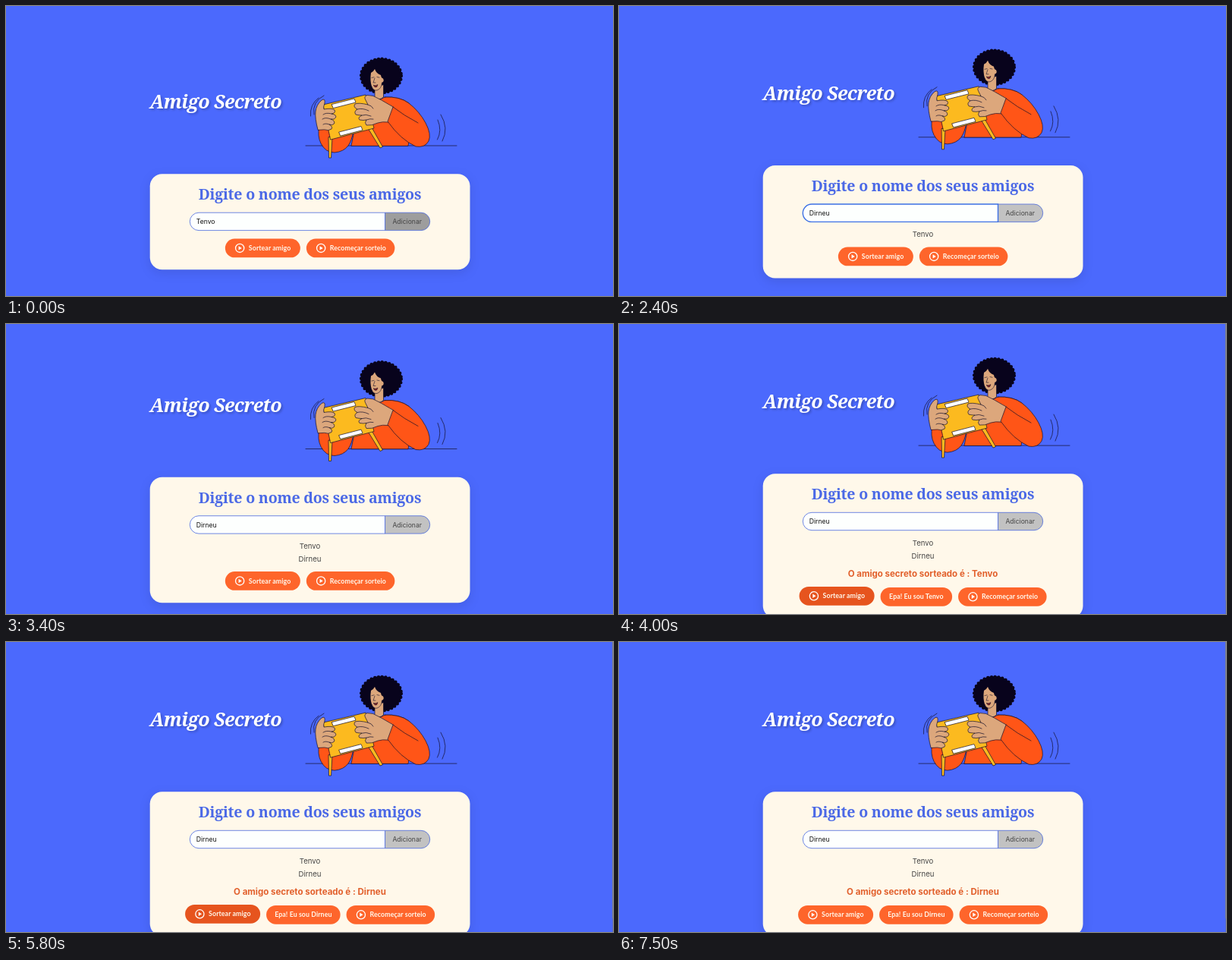
Animation, 800 px wide and 382 px high, one loop 7.6 s. Source, as an HTML page:

```html
<!DOCTYPE html>
<html lang="pt-BR">
<head>
<meta charset="utf-8">
<title>Amigo Secreto</title>
<style>
html, body { margin: 0; width: 100%; height: 100%; overflow: hidden; background: #4b69fd; }
svg { display: block; }
text { font-family: Inter, sans-serif; }
.title { font: italic 700 25px "Noto Serif", serif; letter-spacing: -.65px; fill: #fff; text-shadow: 2px 2px 3px rgba(0,0,0,.22); }
.head { font: 700 19.6px "Noto Serif", serif; letter-spacing: -.23px; fill: #4b69e6; }
.label { font: 700 8.8px Lato, sans-serif; letter-spacing: .08px; fill: #fff8ec; }
.field { font-size: 8.6px; }
.item { font-size: 9.6px; fill: #444; }
.result { font-size: 11.5px; font-weight: 700; fill: #e2602c; }
.card { fill: #fff8ea; filter: drop-shadow(0 4px 7px rgba(0,0,0,.1)); }
.mid { text-anchor: middle; }
.art { stroke: #15102b; stroke-width: .7; stroke-linejoin: round; stroke-linecap: round; }
.skin { fill: #dca77c; }
.shirt { fill: #ff5517; }
.wood { fill: #fcba1f; }
.line { fill: none; }
</style>
</head>
<body>
<svg width="800" height="382">
  <g id="page">
    <text class="title" x="189.5" y="135">Amigo Secreto</text>
    <g class="art">
      <path class="line" d="M395 184H594M412 121Q400 130 401.5 145M419 118Q403 126 406 143M569 150Q575 164 568.5 176M573 143Q584 161 575 178"/>
      <!-- hair -->
      <g fill="#08031c" stroke="#08031c">
        <ellipse cx="494.5" cy="92" rx="26.8" ry="22.8"/>
        <ellipse cx="494.5" cy="92" rx="26.4" ry="22.2" class="line" stroke-width="4.4" stroke-dasharray="0 4.8"/>
      </g>
      <!-- torso -->
      <path class="shirt" d="M455 184Q461 152 468 132L486 121Q492 125 499 120Q519 119 531 128Q540 136 530 184Z"/>
      <path class="skin" d="M486 106V121Q492 125 497.500 120V104Z"/>
      <path class="skin" stroke="none" d="M481 88Q479.500 98 482 106Q484 112 489 111Q495 109 495.500 101Q499 99 497 95.500Q494.500 95 494 91Q488 89 486 83Q484 87 481 88Z"/>
      <path class="line" d="M482 94.500l3-.7M489 93.500l3 .7M486 95l-2 6h3M482 106Q484 112 489 111Q495 109 495.500 101" stroke-width=".6"/>
      <path d="M484.500 104.500q3 .8 5.500-1q-.8 4-3 3.500q-2-.4-2.500-2.500Z" fill="#7d2020" stroke-width=".5"/>
      <!-- far arm -->
      <path class="shirt" d="M413 158Q410 171 415 181Q421 193 433 193Q445 192 451 184Q456 177 458 164Z"/>
      <!-- box on legs -->
      <path class="wood" d="M425 173L425.500 200H428.500L430 173ZM477 161L493 187L496.500 185.500L482 160Z"/>
      <path class="wood" d="M418 130L474 117L485 161L428 176Z"/>
      <path fill="#fff" d="M429.500 129.500L459 122L461 127L431.500 134.500ZM439 166L468 158.500L470 163.500L441 171Z"/>
      <!-- hands -->
      <path class="skin" d="M411 163Q407 148 408 139Q409 130 416 124Q421 121 420 128Q418 133 419 136Q430 134 433 137Q435 141 429 142Q436 143 434.500 147Q433 150 428 149Q434 151 432.500 155Q430 158 426 156Q431 159 429 162Q425 165 420 163Z"/>
      <path class="line" d="M429 142Q422 140 418 143M428 149Q421 146 417 149M426 156Q421 154 418 156"/>
      <path class="skin" d="M510.500 133C503 129 497 125 491 122Q484 117 476 117.500Q471 119 474 124L477 130Q465 127 460 129Q457 133 463 136Q458 139 461 143Q465 144 469 144Q463 147 466 150Q471 151 475 150Q472 154 475 157Q482 158 490 154Q496 152 504 153Z"/>
      <path class="line" d="M463 136Q470 134 478 138M469 144Q474 142 481 145M475 150Q480 148 484 149M477 130Q482 131 484 135"/>
      <!-- near arm -->
      <path class="shirt" d="M500 120Q519 119 531 128Q545 139 553 154Q561 169 557 178Q552 187 540 185Q520 176 503 152L510 133Q518 139 529 146" stroke="none"/>
      <path class="line" d="M499 120Q519 119 531 128Q545 139 553 154Q561 169 557 178Q552 187 540 185Q520 176 503 152L510 133Q524 144 543 154"/>
    </g>
    <g id="form"></g>
  </g>
  <g id="scroll">
    <path d="M799.500 0V382" stroke="#5a6bc9"/>
    <path d="M799.500 0V364" stroke="#7a7f90"/>
  </g>
</svg>
<script>
const LOOP = 7600, FIRST = "Tenvo", SECOND = "Dirneu";
const $ = id => document.getElementById(id);
const within = (t, a, b) => t >= a && t < b;
const clamp = v => Math.max(0, Math.min(1, v));

// page shift, card height and button top for each amount of content
const LAYOUTS = [
  { shift: 0, height: 126, top: 306.5 },
  { shift: 11.2, height: 148.5, top: 328.7 },
  { shift: 19.5, height: 165.5, top: 345.5 },
  { shift: 23.9, height: 190, top: 370.8 }
];

function pill(x, y, w, label, icon, hover = 0) {
  const fill = `rgb(${254 - 24 * hover},${101 - 17 * hover},${43 - 13 * hover})`;
  const content = icon
    ? `<circle cx="19.3" cy="12.4" r="5.6" fill="none" stroke="#fff" stroke-width="1.3"/>
       <path d="M17.700 9.700v5.400l4.200-2.700z" fill="#fff"/>
       <text class="label" x="31" y="15.600">${label}</text>`
    : `<text class="label mid" x="${w / 2}" y="15.600">${label}</text>`;
  return `<g transform="translate(${x} ${y - hover})">
    <rect width="${w}" height="24.8" rx="12.4" fill="${fill}"/>${content}</g>`;
}

function field(t) {
  const selected = within(t, 950, 1250);
  const focused = within(t, 950, 2650);
  const pressed = t < 400 || within(t, 2650, 3000);
  const typed = t < 1250 ? FIRST : SECOND.slice(0, 1 + Math.floor((t - 1250) / 140));
  return `
    <path d="M499.500 272.200H547a11.700 11.700 0 0 1 0 23.400H499.500Z" fill="${pressed ? "#9d9d9d" : "#c2c2c2"}" stroke="#4b69dd" stroke-width=".8"/>
    <path d="M499.500 272.200H254a11.700 11.700 0 0 0 0 23.400H499.500Z" fill="#fdfffe" stroke="${focused ? "#3d70e4" : "#4b69dd"}" stroke-width="${focused ? 1.4 : .8}"/>
    ${selected ? '<rect x="250.500" y="278.500" width="25" height="11" fill="#4c7be8"/>' : ""}
    <text class="field" x="250.800" y="287" fill="${selected ? "#fff" : "#111"}">${typed}</text>
    <text class="field mid" x="528.700" y="287" fill="#444">Adicionar</text>`;
}

function render(t) {
  const step = [300, 2900, 3800].filter(at => t >= at).length;
  const { shift, height, top } = LAYOUTS[step];
  const drawn = t < 5500 ? FIRST : SECOND;
  const hover = within(t, 3500, 4400) ? 1 : t >= 5200 ? clamp((6100 - t) / 200) : 0;

  const items = [FIRST, SECOND].slice(0, step).map((name, i) =>
    `<text class="item mid" x="400.500" y="${315.6 + 17 * i}">${name}</text>`).join("");
  const result = step < 3 ? "" :
    `<text class="result mid" x="400.500" y="357">O amigo secreto sorteado é : ${drawn}</text>`;

  const claim = step < 3 ? 0 : drawn === FIRST ? 94.5 : 97.5;
  const middle = claim && claim + 8;
  const left = 400.6 - (223.5 + middle) / 2;

  $("page").setAttribute("transform", `translate(0 ${-shift})`);
  $("scroll").style.display = step === 3 ? "" : "none";
  $("form").innerHTML = `
    <rect class="card" x="189.700" y="221.200" width="421.800" height="${height}" rx="16"/>
    <text class="head mid" x="400.500" y="255">Digite o nome dos seus amigos</text>
    ${field(t)}${items}${result}
    ${pill(left, top, 99, "Sortear amigo", true, hover)}
    ${claim ? pill(left + 107, top, claim, `Epa! Eu sou ${drawn}`) : ""}
    ${pill(left + 107 + middle, top, 116.5, "Recomeçar sorteio", true)}`;
}

const start = performance.now();
function tick() {
  render((performance.now() - start) % LOOP);
  requestAnimationFrame(tick);
}
tick();
</script>
</body>
</html>
```
